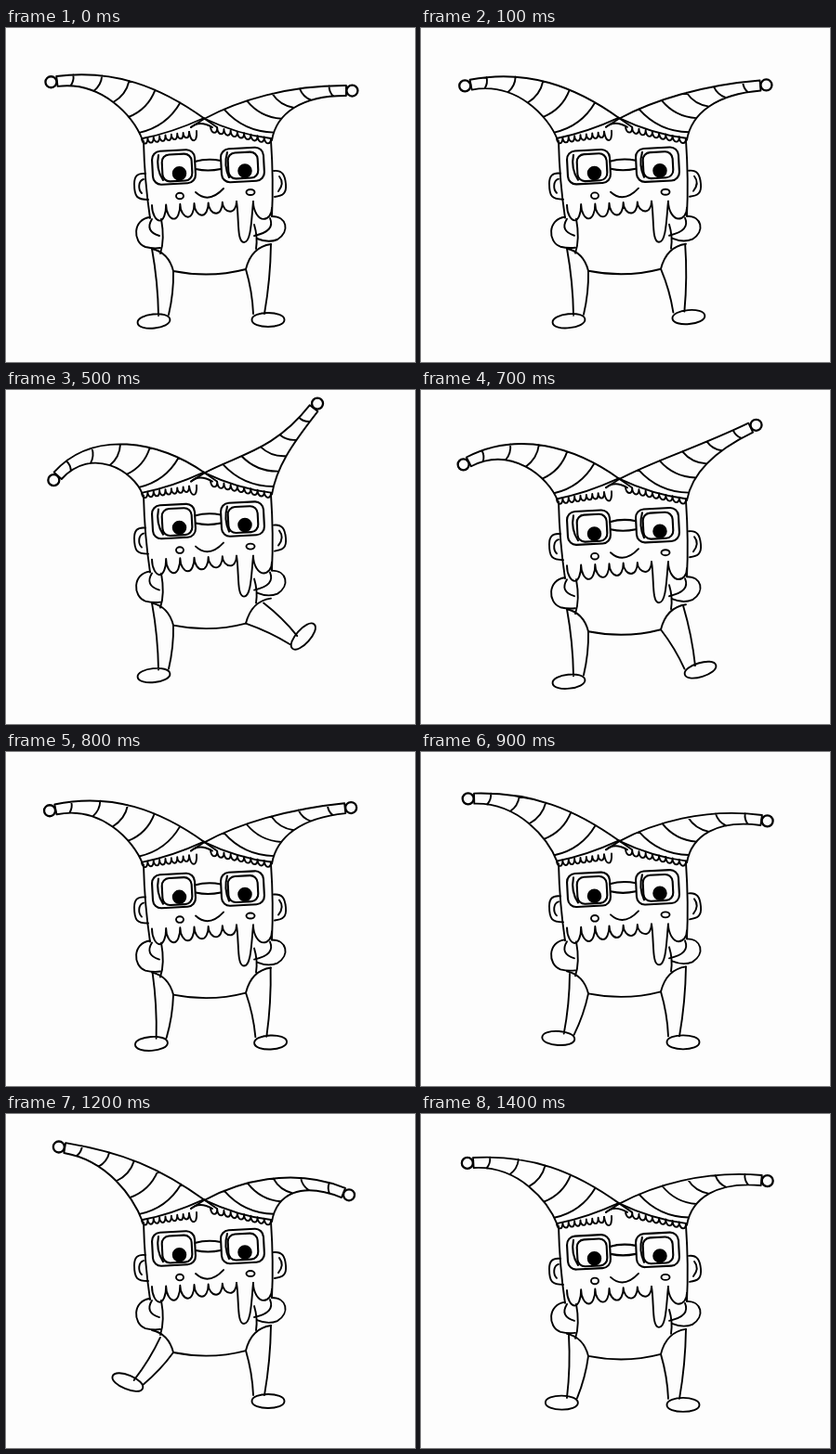
Recreate the animation shown at these times as an HTML page. Size 440 by 360 pixels, loop 1500 ms.

```html
<!DOCTYPE html>
<html lang="en">
<head>
<meta charset="utf-8">
<title>Jester dance</title>
<style>
  html, body { margin: 0; width: 100%; height: 100%; overflow: hidden; background: #fdfdfd; }
  svg { display: block; width: 440px; height: 360px; }
  #figure { fill: none; stroke: #000; stroke-width: 1.9; stroke-linecap: round; stroke-linejoin: round; }
  #balls { fill: #fdfdfd; stroke-width: 2.3; }
  #glasses { stroke-width: 2.1; }
  #pupils { fill: #000; }
</style>
</head>
<body>
<svg viewBox="0 0 440 360">
  <g id="figure">
    <g id="head">
      <path d="M148 122Q149 165 155 205M285 121Q288 165 286 203"/>
      <path d="M150 157C141 156 138 160 138 168C138 182 141 185 153 185M148 163C142 165 142 174 146 178"/>
      <path d="M288 154C297 153 300 158 301 168C302 178 298 181 289 182M294 160C298 165 297 171 293 176"/>
      <path d="M204 177Q218 190 234 173"/>
      <ellipse cx="187" cy="181" rx="4" ry="3.3"/>
      <ellipse cx="263" cy="177" rx="4.5" ry="3"/>
      <path id="beard"/>
      <path d="M248 187C251 205 248 231 256 231C264 231 264 205 266 187"/>
    </g>
    <g id="hat">
      <path d="M147 119Q178 113 213 97M285 119Q250 115 212 97M199 107Q208 99 222 107"/>
      <path id="fringe"/>
      <path d="M197 112C199 124 206 125 205 111"/>
    </g>
    <g id="glasses">
      <rect x="157.500" y="132" width="46" height="36" rx="9" transform="rotate(-3 180 150)"/>
      <rect x="168" y="136" width="32" height="29" rx="8" transform="rotate(-3 184 150)"/>
      <rect x="231.500" y="129.500" width="46" height="36" rx="9" transform="rotate(-3 254 148)"/>
      <rect x="239" y="134" width="32" height="28" rx="8" transform="rotate(-3 255 148)"/>
      <path d="M203 144Q217 140 231 143M204 152Q217 155 231 152M164 137Q161 152 169 164M238 134Q234 148 240 161"/>
    </g>
    <g id="pupils">
      <circle cx="186.500" cy="156.800" r="6.800"/>
      <circle cx="257" cy="154" r="6.800"/>
    </g>
    <g id="body">
      <path d="M155 204C136 206 136 231 150 236Q158 238 166 237M157 206Q149 219 165 224"/>
      <path d="M286 203C302 203 306 219 292 228Q282 232 270 227M284 205Q290 219 267 224"/>
      <path d="M167 206Q171 228 166 243M267 212Q271 225 269 238"/>
      <path d="M157 238Q175 242 180 262Q220 270 258 260Q264 236 285 233"/>
    </g>
    <path id="horns"/>
    <path id="balls"/>
    <path id="legs"/>
  </g>
</svg>
<script>
const LOOP = 1500, STEP = 100, RAD = Math.PI / 180;
const $ = id => document.getElementById(id);
const put = (id, d) => $(id).setAttribute('d', d);
const fmt = p => p[0].toFixed(2) + ' ' + p[1].toFixed(2);
const add = (a, b, k = 1) => [a[0] + b[0] * k, a[1] + b[1] * k];
const mix = (a, b, t) => [a[0] + (b[0] - a[0]) * t, a[1] + (b[1] - a[1]) * t];
const polar = (deg, side = 1) => [side * Math.cos(deg * RAD), -Math.sin(deg * RAD)];
const circle = ([x, y], r) => `M${fmt([x - r, y])}a${r} ${r} 0 1 0 ${2 * r} 0a${r} ${r} 0 1 0 ${-2 * r} 0Z`;

// Row of hanging drips between two points
function drips(a, b, n, depth) {
  let d = 'M' + fmt(a);
  for (let i = 0; i < n; i++) {
    const p = mix(a, b, i / n), q = mix(a, b, (i + 1) / n), m = add(mix(p, q, 0.55), [0, depth(i)]);
    const w = (q[0] - p[0]) / 4;
    d += `C${fmt(mix(p, [p[0], m[1]], 0.6))} ${fmt(add(m, [-w, 0]))} ${fmt(m)}` +
      `C${fmt(add(m, [w, 0]))} ${fmt(mix(q, [q[0], m[1]], 0.6))} ${fmt(q)}`;
  }
  return d;
}
put('beard', drips([157, 191], [248, 187], 6, i => 17 - 1.3 * i) + drips([266, 187], [286, 194], 1, () => 15));
put('fringe', drips([146, 119], [197, 112], 8, () => 6) + drips([220, 106], [285, 119], 9, () => 6));

// The tip rides on a circle round the pivot; tilt is the angle of the tip itself
const leftHorn = {
  side: -1, pivot: [113.5, 78], reach: 68,
  angle: s => 20.5 - 0.6 * s, tilt: e => e - 24,
  top: [[214, 98], [165, 62.5]], low: [[147, 121], [137, 95]], cross: [227, 107]
};
const rightHorn = {
  side: 1, pivot: [320.7, 73], reach: 52,
  angle: s => s, tilt: e => 0.77 * e - 5,
  top: [[213, 98], [250, 78]], low: [[286, 121], [291, 92]], cross: [199, 107]
};

const bezier = (c, t) => {
  const [a, b, d] = [0, 1, 2].map(i => mix(c[i], c[i + 1], t));
  return mix(mix(a, b, t), mix(b, d, t), t);
};
const cubic = c => `M${fmt(c[0])}C${c.slice(1).map(fmt).join(' ')}`;

function horn(h, sway) {
  const e = h.angle(sway), u = polar(h.tilt(e), h.side);
  const tip = add(h.pivot, polar(e, h.side), h.reach);
  const neck = add(tip, u, -6.5), n = [u[1] * h.side, -u[0] * h.side];
  const edge = (base, half, pull) => {
    const end = add(neck, n, half);
    return [...base, add(end, u, -pull), end];
  };
  const top = edge(h.top, 5.5, 62), low = edge(h.low, -5.5, 48);
  let d = cubic(top) + cubic(low) + `M${fmt(top[0])}L${fmt(h.cross)}M${fmt(top[3])}L${fmt(low[3])}`;
  for (let i = 1; i <= 5; i++) {
    const a = bezier(top, 0.18 * i), b = bezier(low, 0.2 * i - 0.1);
    const c = add(mix(a, b, 0.5), [b[1] - a[1], a[0] - b[0]], -0.22 * h.side);
    d += `M${fmt(a)}Q${fmt(c)} ${fmt(b)}`;
  }
  return [d, circle(tip, 6)];
}

const leftLeg = {
  hip: [168, 245], turn: 29, shrink: 0.145, slip: [9, 8],
  starts: [[157, 238], [180, 262]], ankles: [[-4, 65], [7, 64]], shoe: [-9, 71], rest: -6
};
const rightLeg = {
  hip: [271, 245], turn: -48.5, shrink: 0.2, slip: [-8, 5],
  starts: [[285, 233], [258, 260]], ankles: [[7, 63], [-5, 63]], shoe: [11, 69.5], rest: 0
};

function leg(g, kick) {
  const size = 1 - g.shrink * kick, x = polar(-g.turn * kick), y = [-x[1], x[0]];
  const limb = p => add(add(g.hip, x, p[0]), y, p[1] * size);
  let d = '';
  g.starts.forEach((p, i) => {
    const a = i ? p : add(p, g.slip, kick), b = limb(g.ankles[i]);
    d += `M${fmt(a)}Q${fmt(add(mix(a, b, 0.5), x, 3))} ${fmt(b)}`;
  });
  const c = limb(g.shoe), tilt = g.rest + g.turn * kick;
  const [toe, heel] = [-17.5, 17.5].map(r => add(c, polar(-tilt), r));
  return d + `M${fmt(toe)}` + [heel, toe].map((p, i) => {
    const q = i ? heel : toe, v = add([0, 0], polar(90 - tilt), i ? -10 : 10);
    return `C${fmt(add(q, v))} ${fmt(add(p, v))} ${fmt(p)}`;
  }).join('') + 'Z';
}

// Eased rise from start to peak, then fall to end
function swing(t, start, peak, end) {
  if (t <= start || t >= end) return 0;
  const x = t < peak ? (t - start) / (peak - start) : (end - t) / (end - peak);
  return Math.sin(x * Math.PI / 2) ** 2;
}

function draw(ms) {
  const t = Math.floor(ms % LOOP / STEP) * STEP;
  const right = swing(t, 0, 480, 850), left = swing(t, 720, 1180, 1500);
  const sway = 6 + 68 * swing(t, 0, 500, 900) - 28 * left;
  const [l, r] = [leftHorn, rightHorn].map(h => horn(h, sway));
  put('horns', l[0] + r[0]);
  put('balls', l[1] + r[1]);
  put('legs', leg(leftLeg, left) + leg(rightLeg, right));
  const lift = 8.5 * right ** 1.5 + 5 * left;
  $('figure').setAttribute('transform', `translate(0 ${-lift.toFixed(2)})`);
}

const begin = performance.now();
function tick() {
  draw(performance.now() - begin);
  requestAnimationFrame(tick);
}
tick();
</script>
</body>
</html>
```
